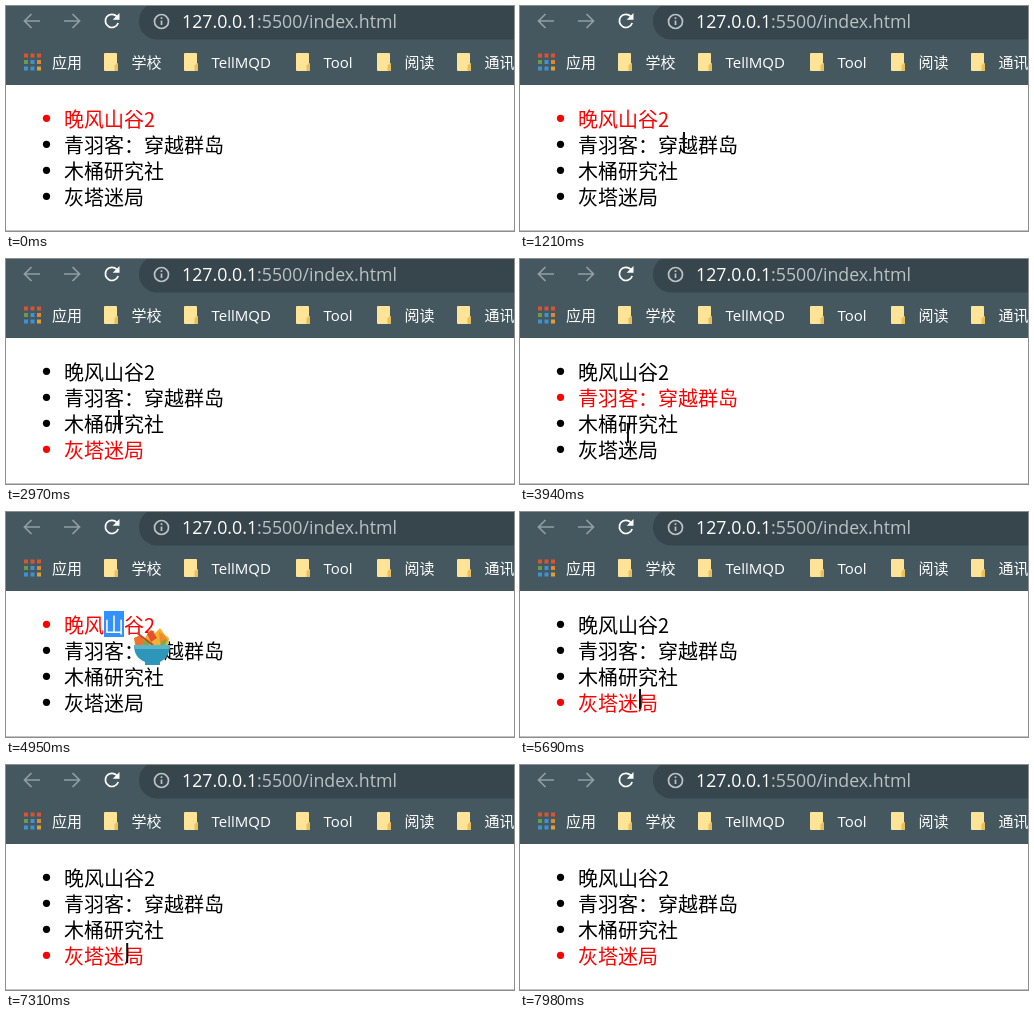
Animation, 508 px wide and 225 px high, one loop 8.51 s. Source, as an HTML page:

```html
<!DOCTYPE html>
<html lang="zh-CN">
<head>
<meta charset="utf-8">
<title>列表点击</title>
<style>
  html, body { margin: 0; width: 100%; height: 100%; overflow: hidden; background: #fff; }
  svg { display: block; width: 100vw; height: 100vh; }
  .list { font: 20px "Noto Sans CJK SC", "Noto Sans CJK", sans-serif; }
  .list g { fill: #000; }
  .list g.red { fill: #f00; }
  .marks { font: 500 15px "Open Sans", "Noto Sans CJK SC", "Noto Sans CJK", sans-serif; fill: #fff; }
  .address { font: 17.75px "Open Sans", sans-serif; fill: #b9c2c6; }
  .icon { fill: none; stroke-width: 1.7; }
</style>
</head>
<body>
<svg id="stage" viewBox="0 0 508 225" preserveAspectRatio="none">
  <defs>
    <g id="folder">
      <path d="M1 0h11q1 0 1 1v9l1 1v6q0 1-1 1H1q-1 0-1-1V1q0-1 1-1z" fill="#ffe397"/>
      <path d="M10.500 18v-5.500l2.500-2.500 1 1v6q0 1-1 1z" fill="#e9bf58"/>
    </g>
  </defs>
  <rect width="508" height="225" fill="#fff"/>
  <rect width="508" height="79" fill="#455860"/>
  <rect x="133" y="-3" width="400" height="36.5" rx="18" fill="#37464d"/>
  <g class="icon" stroke="#919ea4">
    <path d="M34 15H18.500M25.500 8 18.500 15l7 7"/>
    <path d="M58 15h15.500M66.500 8l7 7-7 7"/>
  </g>
  <path class="icon" stroke="#fff" stroke-width="2" d="M110.800 10.400A6.600 6.600 0 1 0 112.200 17"/>
  <path d="M113.500 7v6.800h-6.800z" fill="#fff"/>
  <g class="icon" stroke="#bac3c7">
    <circle cx="155.500" cy="15.500" r="7"/>
    <path d="M155.500 14.500v4.500M155.500 11.300v1.800"/>
  </g>
  <text class="address" x="176" y="21.500"><tspan fill="#fff">127.0.0.1</tspan>:5500/index.html</text>
  <g id="apps"></g>
  <g id="marks" class="marks"></g>
  <rect y="224" width="508" height="1" fill="#c3c3c3"/>
  <rect id="selection" x="98" y="99" width="20" height="26" fill="#3390ff"/>
  <g id="list" class="list"></g>
  <rect id="beam" x="-1" y="-10" width="2" height="20" fill="#111"/>
  <g id="bowl">
    <path d="M2 18 1 10 8 7l3 4 6-9 5 3 5-5 5 7 4 3-1 8z" fill="#f2b32c"/>
    <path d="m1 10 7-3 5 9-10 2z" fill="#ed7430"/>
    <path d="m14 6 5-4 5 8-6 4z" fill="#e6502f"/>
    <path d="m26 4 5 3 4 6-8 2z" fill="#ef8a2e"/>
    <path d="m10 12 5 1 2 5h-7zM29 13l5-2-2 6h-5z" fill="#7daa45"/>
    <path d="m4 5 16 12" stroke="#b94c32" stroke-width="2"/>
    <path d="M1 17h36c0 9-4 14-10 17v3H12v-3C5 31 1 26 1 17z" fill="#2e96b8"/>
    <path d="M1 17h36l-.6 4H1.600z" fill="#58b5cb"/>
  </g>
</svg>
<script>
const LOOP = 8510;
const NS = "http://www.w3.org/2000/svg";
const byId = id => document.getElementById(id);

function add(parent, tag, attrs, text = "") {
  const node = document.createElementNS(NS, tag);
  for (const [key, value] of Object.entries(attrs)) node.setAttribute(key, value);
  node.textContent = text;
  return parent.appendChild(node);
}

["#d9542f", "#d9542f", "#d9542f", "#6b9a4a", "#3f92cf", "#e0862f", "#3f92cf", "#3f92cf", "#e0a02f"]
  .forEach((fill, i) => add(byId("apps"), "rect",
    { x: 18 + i % 3 * 6.5, y: 47.5 + Math.floor(i / 3) * 6.5, width: 4, height: 4, fill }));

add(byId("marks"), "text", { x: 46, y: 62 }, "应用");
[[98, "学校"], [178, "TellMQD"], [290, "Tool"], [371, "阅读"], [451, "通讯"]].forEach(([x, label]) => {
  add(byId("marks"), "use", { href: "#folder", x, y: 47 });
  add(byId("marks"), "text", { x: x + 27.5, y: 62 }, label);
});

const items = ["晚风山谷2", "青羽客：穿越群岛", "木桶研究社", "灰塔迷局"].map((title, i) => {
  const row = add(byId("list"), "g", {});
  add(row, "circle", { cx: 40.5, cy: 112.3 + i * 26, r: 3.6 });
  const text = add(row, "text", { x: 58, y: 120.5 + i * 26 });
  for (const char of title) add(text, "tspan", {}, char);
  return row;
});
const selectedChar = items[0].querySelectorAll("tspan")[2];

// [time, active row]
const clicks = [[0, 0], [1290, 1], [2040, 2], [2570, 3], [3440, 1], [4200, 3],
  [4720, 0], [5650, 3], [6090, 1], [6690, 0], [7250, 3]];

// [time, x, y, pointer shape until the next step]
const path = [
  [0, 457, 225, ""], [260, 418, 205, "bowl"], [520, 222, 145, "beam"], [730, 140, 136, "beam"],
  [1060, 140, 136, "beam"], [1210, 164, 136, "beam"], [1400, 162, 139, "beam"],
  [1840, 124, 162, "beam"], [2040, 124, 162, "beam"], [2310, 112, 185, "beam"],
  [2700, 112, 185, "beam"], [2970, 113, 161, "beam"], [3370, 115, 142, "beam"],
  [3500, 115, 136, "beam"], [3680, 113, 128, "beam"], [3940, 108, 174, "beam"],
  [4200, 108, 196, "beam"], [4360, 108, 194, "beam"], [4660, 110, 116, "beam"],
  [4820, 112, 112, "beam"], [4880, 127, 116, "bowl"], [5230, 127, 116, "bowl"],
  [5380, 146, 135, "beam"], [5600, 120, 187, "beam"], [5750, 120, 187, "beam"],
  [6030, 126, 139, "beam"], [6360, 126, 139, "beam"], [6560, 126, 119, "beam"],
  [6850, 125, 115, "beam"], [7180, 120, 188, "beam"], [7400, 122, 188, "beam"],
  [7540, 150, 188, "bowl"], [7910, 388, 212, ""], [LOOP, 388, 212, ""]
];

const lastBefore = (steps, t) => steps.findLastIndex(step => step[0] <= t);

function draw(t) {
  const active = clicks[lastBefore(clicks, t)][1];
  items.forEach((row, i) => row.classList.toggle("red", i === active));

  const selected = t >= 4800 && t < 5650;
  byId("selection").style.display = selected ? "" : "none";
  selectedChar.style.fill = selected ? "#fff" : "";

  const i = lastBefore(path, t);
  const [t0, x0, y0, shape] = path[i];
  const [t1, x1, y1] = path[i + 1];
  const part = (t - t0) / (t1 - t0);
  const x = x0 + (x1 - x0) * part, y = y0 + (y1 - y0) * part;
  for (const id of ["beam", "bowl"]) {
    byId(id).style.display = id === shape ? "" : "none";
    byId(id).setAttribute("transform", `translate(${x} ${y})`);
  }
}

const start = performance.now();
function tick() {
  draw((performance.now() - start) % LOOP);
  requestAnimationFrame(tick);
}
tick();
</script>
</body>
</html>
```
